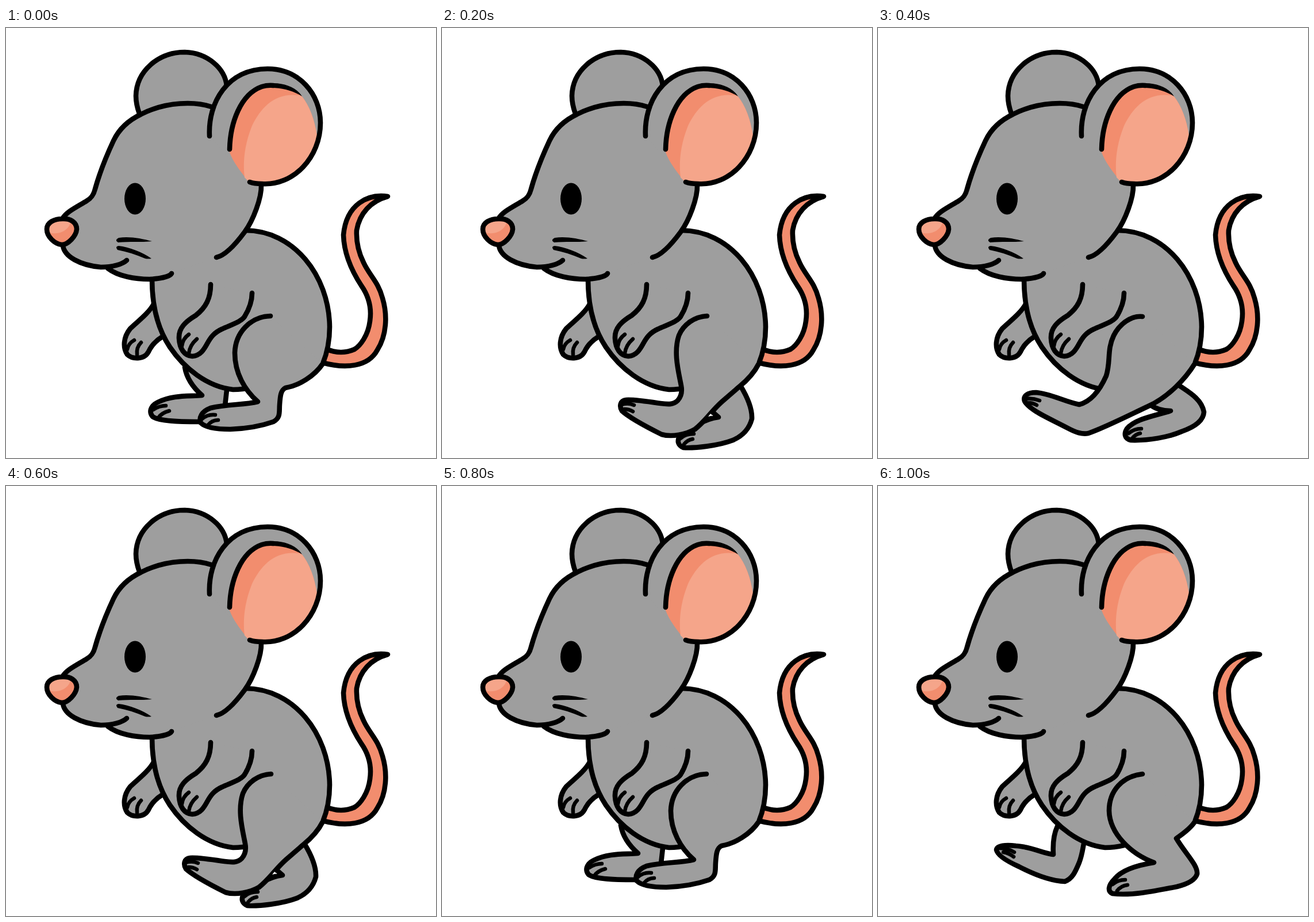
Recreate the animation shown at these times as an HTML page. Size 748 by 748 pixels, loop 1200 ms.

```html
<!DOCTYPE html>
<html lang="en">
<head>
<meta charset="utf-8">
<title>Walking mouse</title>
<style>
  html, body { margin: 0; width: 100%; height: 100%; overflow: hidden; background: #fff; }
  svg { display: block; width: 100%; height: 100%; }
  path { fill: none; stroke: #000; stroke-width: 8.6; stroke-linecap: round; stroke-linejoin: round; }
  .fur { fill: #9e9e9e; }
  .pink { fill: #f28d6e; }
  .light { fill: #f5a58a; }
  .flat { stroke: none; }
  .ink { fill: #000; stroke: none; }
  .toes { stroke-width: 6.5; }

  /* The four leg poses swap without blending. */
  .stand, .pass, .reach, .step { visibility: hidden; animation: 1.2s step-end infinite; }
  .stand { animation-name: stand; }
  .pass { animation-name: pass; }
  .reach { animation-name: reach; }
  .step { animation-name: step; }
  @keyframes stand {
    0%, 66.666% { visibility: visible; }
    16.666%, 83.333%, 100% { visibility: hidden; }
  }
  @keyframes pass {
    0%, 33.333%, 66.666%, 100% { visibility: hidden; }
    16.666%, 50% { visibility: visible; }
  }
  @keyframes reach {
    0%, 50%, 100% { visibility: hidden; }
    33.333% { visibility: visible; }
  }
  @keyframes step {
    0% { visibility: hidden; }
    83.333%, 100% { visibility: visible; }
  }
</style>
</head>
<body>
<svg viewBox="0 0 748 748">
  <!-- tail -->
  <path class="pink" d="M550 582C590 593 630 590 646 560C662 535 664 500 655 470C648 442 632 430 622 408C613 390 609 372 610 352C615 322 635 301 664 293C630 288 592 306 587 360C588 395 603 425 618 448C632 468 636 490 633 510C630 535 616 553 606 559C590 566 572 565 556 558"/>

  <!-- far legs -->
  <g class="stand">
    <path class="fur" d="M311 590C314 608 325 625 341 639C318 641 290 638 264 651C250 658 249 669 255 676C266 684 300 685 335 685L381 657L384 630"/>
    <path class="toes" d="M278 657C269 657 262 660 256 664M284 666C276 668 269 672 265 678"/>
  </g>
  <g class="pass">
    <path class="fur" d="M519 622C530 640 540 660 539 680C534 699 522 710 506 717C480 727 440 731 420 730C410 726 409 718 413 711C430 698 455 680 481 677L466 664"/>
    <path class="toes" d="M438 706C428 706 420 709 415 714M436 715C430 716 425 719 421 724"/>
  </g>
  <g class="reach">
    <path class="fur" d="M521 620C540 633 563 645 567 668C566 685 548 695 528 702C505 712 470 718 440 717C428 714 428 705 433 697C447 680 480 675 509 666C495 666 482 662 473 655"/>
    <path class="toes" d="M458 697C450 697 442 700 436 705M456 705C450 706 446 709 442 714"/>
  </g>
  <g class="step">
    <path class="fur" d="M312 592C305 607 304 625 305 641C290 640 265 627 240 626C222 624 207 625 206 633C208 643 225 653 245 662C270 675 300 687 325 688C338 683 343 672 350 655C355 642 356 632 358 622"/>
    <path class="toes" d="M237 637C229 632 220 630 211 630M236 645C230 640 224 638 218 637"/>
  </g>

  <!-- far arm -->
  <path class="fur" d="M257 480C247 498 228 511 216 523C204 538 203 556 211 568C219 576 240 578 248 563C254 550 262 543 272 537"/>
  <path class="toes" d="M223 543C216 547 212 553 211 559M235 547C229 553 227 560 228 568"/>

  <!-- body -->
  <path class="fur flat" d="M254 437C254 485 265 525 285 555C310 592 350 624 395 629Q412 629 428 625L520 608L551 584C560 562 563 540 563 520C562 430 500 352 420 352Z"/>
  <path d="M254 437C254 485 265 525 285 555C310 592 350 624 395 629Q412 629 428 625M551 584C560 562 563 540 563 520C562 430 500 352 416 352"/>

  <!-- near legs -->
  <g class="stand">
    <path class="fur" d="M460 501C425 502 399 530 398 565C398 600 415 630 438 650C415 656 385 654 356 661C340 667 335 678 339 687C347 695 365 698 390 698C420 697 445 692 465 685C478 678 475 668 476 655C477 640 478 630 486 626C510 622 537 605 551 584"/>
    <path class="toes" d="M364 673C355 672 347 675 341 680M369 682C361 682 355 686 351 691"/>
  </g>
  <g class="pass">
    <path class="fur" d="M461 501C440 502 420 515 412 535C402 565 412 600 416 622C418 632 417 640 410 648C403 655 395 655 380 653C360 650 335 646 320 647C310 648 308 658 313 666C325 677 350 691 382 707C400 712 425 707 440 698C458 684 468 667 487 650L517 624C532 612 544 598 551 584"/>
    <path class="toes" d="M334 656C327 653 320 653 313 655M332 667C327 664 322 663 317 663"/>
    <path class="flat" style="fill:#fff" d="M467 671L471 674L463 676Z"/>
  </g>
  <g class="reach">
    <path class="fur" d="M460 502C440 500 420 515 410 535C398 560 405 580 397 605C385 632 370 650 350 655C325 650 300 636 275 634C260 634 252 640 255 649C263 665 300 680 330 696C345 704 355 707 366 705C395 695 440 672 470 658C505 642 535 610 551 584"/>
    <path class="toes" d="M281 648C273 645 265 644 257 645M276 656C271 653 266 652 261 652"/>
  </g>
  <g class="step">
    <path class="fur" d="M460 501C425 505 402 530 402 565C403 605 440 640 480 655C455 659 425 667 412 683C400 695 399 705 408 709C440 713 480 705 520 697C540 692 552 685 555 675C557 660 535 640 519 613C532 604 545 594 551 584"/>
    <path class="toes" d="M430 685C421 685 414 688 408 693M434 694C426 695 420 699 416 704"/>
  </g>

  <!-- near arm -->
  <path class="fur" d="M356 446C356 470 348 486 330 500C312 511 300 522 301 540C302 558 310 570 324 571C338 570 344 560 350 549C356 538 362 530 375 524C395 515 409 511 415 502C423 489 428 476 428 461"/>
  <path class="toes" d="M318 533C311 538 307 545 306 553M332 541C324 548 319 557 318 566"/>

  <!-- far ear -->
  <path class="fur flat" d="M232 149C228 138 226 128 226 118C227 75 265 42 311 42C350 43 381 70 384 101L357 140Z"/>
  <path d="M232 149C228 138 226 128 226 118C227 75 265 42 311 42C350 43 381 70 384 101"/>

  <!-- head -->
  <path class="fur flat" d="M357 137C330 128 280 127 235 150C210 162 196 177 187 196C172 228 162 255 155 280C152 292 147 297 140 301C120 313 105 320 98 332L99 378C101 398 130 413 165 416L175 417C195 432 225 437 250 437C270 436 285 432 288 427L366 399C380 396 398 378 415 355C430 335 445 295 444 273Z"/>
  <path d="M357 137C330 128 280 127 235 150C210 162 196 177 187 196C172 228 162 255 155 280C152 292 147 297 140 301C120 313 105 320 98 332"/>
  <path d="M99 378C101 398 130 413 165 416C185 416 203 411 210 404M177 418C195 432 225 437 250 437C270 436 285 432 288 427"/>
  <path d="M444 273C445 295 430 335 415 355C398 378 380 396 366 399"/>

  <!-- nose -->
  <path class="pink flat" d="M98 332C112 331 123 338 123 350C122 362 108 377 97 377C85 376 71 363 71 350C71 338 84 332 98 332Z"/>
  <path class="light flat" d="M75 356C95 361 111 350 113 335L98 332L80 336L72 350Z"/>
  <path d="M98 332C112 331 123 338 123 350C122 362 108 377 97 377C85 376 71 363 71 350C71 338 84 332 98 332Z"/>

  <!-- eye and whiskers -->
  <ellipse cx="224.500" cy="297" rx="18.500" ry="27.500"/>
  <path class="ink" d="M196 365C214 362 236 366 254 371C236 373 214 371 195 373Q188 369 196 365Z"/>
  <path class="ink" d="M196 379C214 381 238 390 253 401Q247 402 242 401C226 394 210 389 194 386Q189 380 196 379Z"/>

  <!-- near ear -->
  <path class="fur flat" d="M354 188C351 130 385 71 455 71C510 71 547 115 547 165C547 225 500 275 445 271L424 268Z"/>
  <path class="pink flat" d="M387 211C390 165 405 115 445 102C470 96 500 103 514 118C528 135 537 160 541 188C530 240 485 272 445 271L421 266C406 247 394 232 387 211Z"/>
  <path class="light flat" d="M514 118C470 110 444 137 428 170C414 205 412 235 415 260L421 266L445 271C485 272 530 240 541 188C537 160 528 135 514 118Z"/>
  <path d="M354 188C351 130 385 71 455 71C510 71 547 115 547 165C547 225 500 275 445 271Q432 271 424 268"/>
  <path d="M389 211C390 165 408 115 445 102Q455 99 465 100"/>
  <path class="ink" d="M462 96C485 95 506 104 515 119C500 109 480 104 462 104Z"/>
</svg>
</body>
</html>
```
